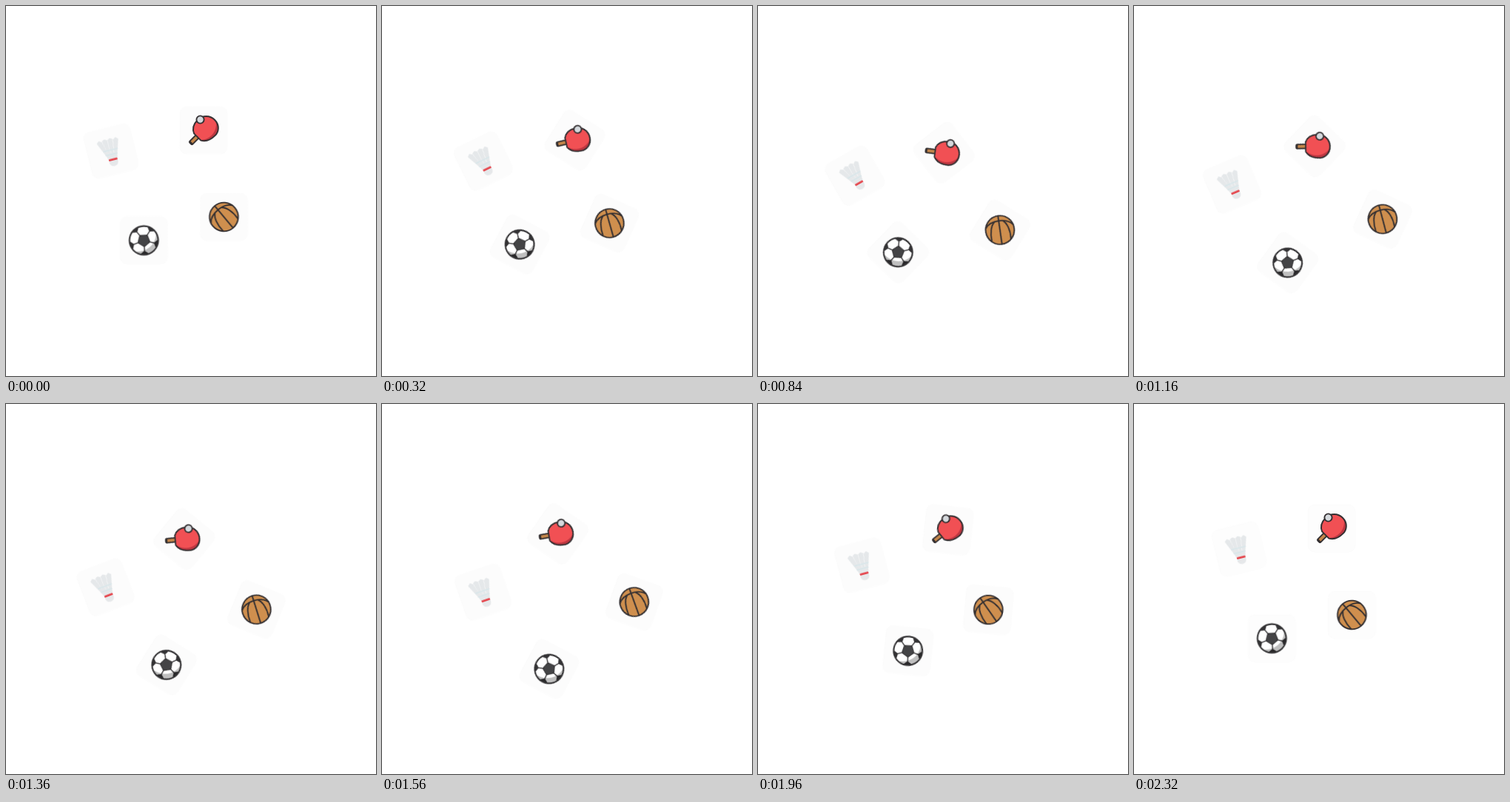
An HTML page for the animation above (8000 ms loop, 500 by 500 pixels).

```html
<!DOCTYPE html>
<html lang="en">
<head>
<meta charset="utf-8">
<title>Drifting sports icons</title>
<style>
  html, body { margin: 0; width: 100%; height: 100%; overflow: hidden; background: #fff; }
  svg { display: block; width: 100%; height: 100%; }

  .drift { animation: 8s linear infinite; }
  #paddle .drift { animation-name: paddle; }
  #shuttle .drift { animation-name: shuttle; }
  #soccer .drift { animation-name: soccer; }
  #basket .drift { animation-name: basket; }

  /* two straight legs out, then an eased return and a long rest */
  @keyframes paddle {
    0%, 29%, 100% { transform: translate(0, 0) rotate(0deg); }
    4% { transform: translate(-6.5px, 13.3px) rotate(32deg); }
    9.75% { transform: translate(-14.2px, 32px) rotate(54deg); }
    14.5% { transform: translate(-22.8px, 21.5px) rotate(44deg); }
    19.5% { transform: translate(-29.5px, 7.5px) rotate(35deg); }
    21% { transform: translate(-25.7px, 6.2px) rotate(28deg); }
    24.5% { transform: translate(-10.3px, 2px) rotate(6.5deg); animation-timing-function: cubic-bezier(.33, .5, .67, 1); }
  }
  @keyframes shuttle {
    0%, 29%, 100% { transform: translate(0, 0) rotate(0deg); }
    4% { transform: translate(-5px, 13.5px) rotate(-12deg); }
    9.75% { transform: translate(-11.5px, 31px) rotate(-17deg); }
    14.5% { transform: translate(-9.5px, 45px) rotate(-9deg); }
    19.5% { transform: translate(-5.5px, 58.2px) rotate(-5deg); }
    21% { transform: translate(-4.8px, 51px) rotate(-4deg); }
    24.5% { transform: translate(-1.5px, 22px) rotate(-1deg); animation-timing-function: cubic-bezier(.33, .5, .67, 1); }
  }
  @keyframes soccer {
    0%, 29%, 100% { transform: translate(0, 0) rotate(0deg); }
    4% { transform: translate(-.2px, 5.5px) rotate(28deg); }
    9.75% { transform: translate(-.5px, 13.4px) rotate(46deg); }
    14.5% { transform: translate(21.3px, 30.2px) rotate(36deg); }
    19.5% { transform: translate(39.6px, 41.4px) rotate(28deg); }
    21% { transform: translate(34.5px, 36.3px) rotate(22deg); }
    24.5% { transform: translate(16.5px, 16.9px) rotate(6deg); animation-timing-function: cubic-bezier(.33, .5, .67, 1); }
  }
  @keyframes basket {
    0%, 29%, 100% { transform: translate(0, 0) rotate(0deg); }
    4% { transform: translate(13px, 8.5px) rotate(24deg); }
    9.75% { transform: translate(30.9px, 20.5px) rotate(33deg); }
    14.5% { transform: translate(41.5px, 3px) rotate(25deg); }
    19.5% { transform: translate(46.5px, -17.5px) rotate(20deg); }
    21% { transform: translate(40.2px, -15.3px) rotate(16deg); }
    24.5% { transform: translate(17px, -7px) rotate(5deg); animation-timing-function: cubic-bezier(.33, .5, .67, 1); }
  }

  .tile { fill: #fcfcfc; stroke: #fcfcfc; stroke-width: .8; animation: tile 8s linear infinite; }
  @keyframes tile {
    0%, 5%, 29%, 100% { fill: #fcfcfc; }
    10%, 28.6% { fill: #fff; }
  }

  .ink { stroke: #332f31; stroke-width: 1.9; stroke-linejoin: round; stroke-linecap: round; }
  .line { fill: none; }
</style>
</head>
<body>
<svg viewBox="0 0 500 500">
  <defs>
    <rect id="tile" class="tile" x="-32" y="-32" width="64" height="64" rx="9"/>
    <path id="blade" d="M-15 -6 C-12 -13 -5 -15.6 1 -15.6 C11 -15.6 17.8 -8.5 17.8 .5 C17.8 10 11 16 3 16 C-5 16 -11.5 13.5 -15 7 Z"/>
    <clipPath id="bladeClip"><use href="#blade"/></clipPath>
    <path id="patch" d="M7.5 -4.6 V4.6 L12.2 8 L17.3 6.2 Q19.4 0 17.3 -6.2 L12.2 -8 Z"/>
  </defs>

  <g id="shuttle" transform="translate(142 196)">
    <g class="drift">
      <g transform="rotate(-14)">
        <use href="#tile"/>
        <g fill="#e5e8ea">
          <path d="M-16.5 -14 L-13 -17 L-9.3 -14.5 L-2.5 10 H-6 Z"/>
          <path d="M-9 -15.5 L-5.5 -17.5 L-1.8 -15.5 L-.8 10 H-3 Z"/>
          <path d="M-1.4 -15.5 L2.2 -17.5 L5.8 -15.5 L2 10 H-.4 Z"/>
          <path d="M6.2 -14.5 L10 -17 L13.4 -14 L6 10 H2.4 Z"/>
          <path d="M-8.5 3 H7.8 L6 11 H-6 Z"/>
        </g>
        <path d="M-10.5 -1.5 H9.5 M-8.4 4.5 H7.5" fill="none" stroke="#d8e6ea" stroke-width="1.3"/>
        <path d="M-6 12.5 H6 V15.5 Q5 20.7 0 20.7 Q-5 20.7 -6 15.5 Z" fill="#e6e8ea"/>
        <rect x="-6" y="10.3" width="12" height="2.6" rx="1" fill="#e5484f"/>
      </g>
    </g>
  </g>

  <g id="paddle" transform="translate(267 168)">
    <g class="drift">
      <use href="#tile"/>
      <g transform="translate(2 -2) rotate(-45)">
        <rect class="ink" x="-27.8" y="-2.8" width="16" height="5.6" rx="1.5" fill="#c4864a"/>
        <path d="M-26.6 -2.2 V2.2" class="ink"/>
        <use href="#blade" fill="#bd3640"/>
        <ellipse cx="0" cy="-4" rx="19" ry="16.4" fill="#f15054" clip-path="url(#bladeClip)"/>
        <use href="#blade" class="ink line"/>
      </g>
      <circle class="ink" cx="-4.5" cy="-14.5" r="5.1" fill="#d5d9dd"/>
    </g>
  </g>

  <g id="soccer" transform="translate(186.3 316.7)">
    <g class="drift">
      <use href="#tile"/>
      <circle r="20.5" fill="#343335"/>
      <circle r="7" fill="#444446"/>
      <g transform="rotate(50)">
        <g fill="#fff">
          <use href="#patch"/>
          <use href="#patch" transform="rotate(72)"/>
          <use href="#patch" transform="rotate(144)"/>
          <use href="#patch" transform="rotate(216)"/>
          <use href="#patch" transform="rotate(288)"/>
        </g>
        <path d="M4 -18 A18.5 18.5 0 0 1 4 18 A24 24 0 0 0 4 -18" opacity=".25"/>
      </g>
    </g>
  </g>

  <g id="basket" transform="translate(294.4 285)">
    <g class="drift">
      <use href="#tile"/>
      <g class="ink" transform="rotate(-40)">
        <circle r="19.4" fill="#cf8f4e"/>
        <path class="line" d="M0 -19 V19 M-18.5 -5 C-11 -15 11 -15 18.5 -5 M-5.5 -12 C-11 -8 -14 2 -13 14 M5.5 -12 C11 -8 14 2 13 14"/>
      </g>
    </g>
  </g>
</svg>
</body>
</html>
```
